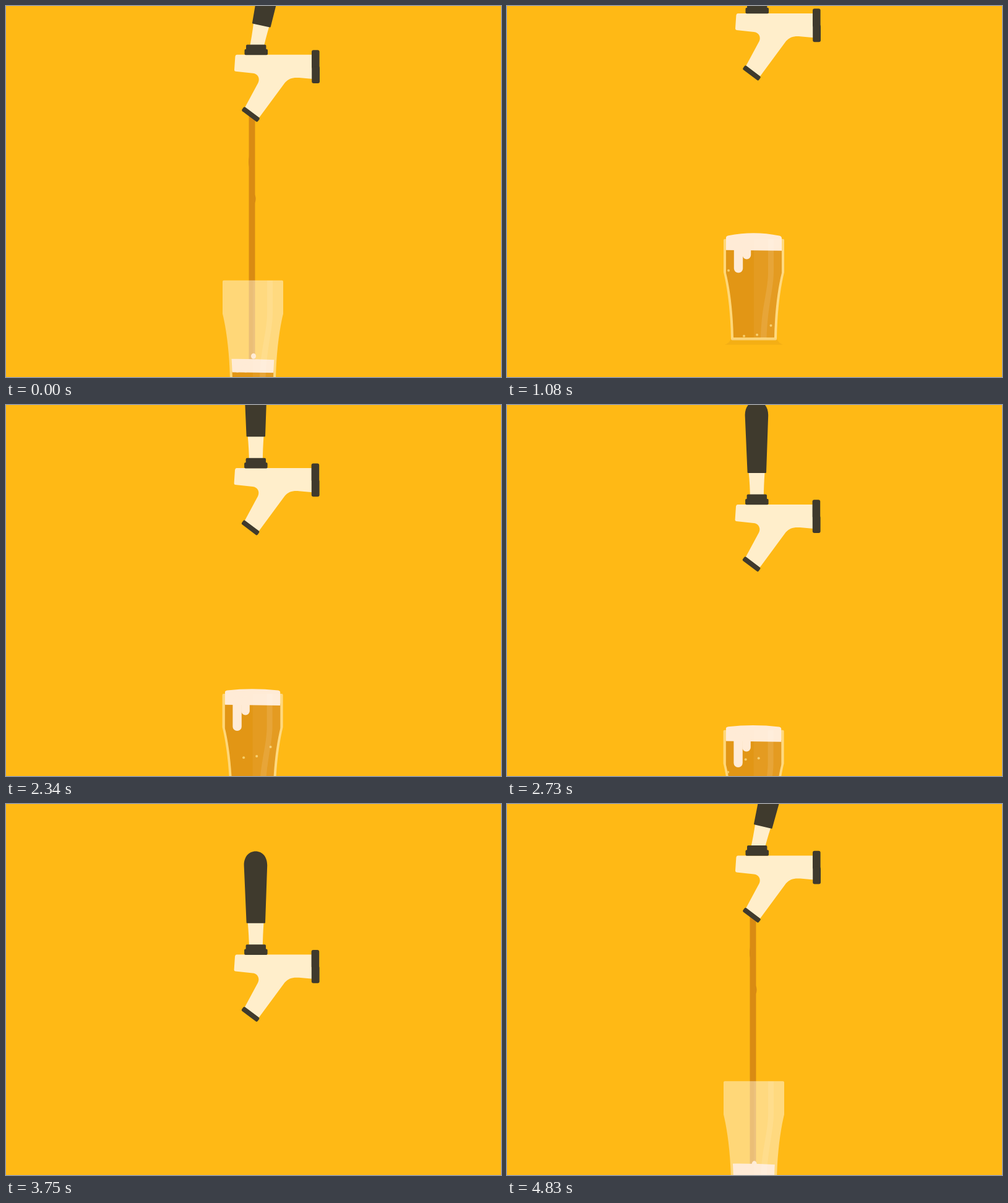
An HTML page for the animation above (4860 ms loop, 800 by 600 pixels).

```html
<!DOCTYPE html>
<html lang="en">
<head>
<meta charset="utf-8">
<title>Pouring a pint</title>
<style>
  html, body { margin: 0; width: 100%; height: 100%; overflow: hidden; background: #ffb915; }
  svg { display: block; width: 100vw; height: 100vh; }
  .dark { fill: #3f3a2d; }
  .cream { fill: #ffeecb; }
  .beer { fill: #e29615; }
  .foam { fill: #ffebd6; }
  .stream { fill: #d98b13; }
  .bubble { fill: #f7cd68; }
</style>
</head>
<body>
<svg viewBox="0 0 800 600">
  <defs>
    <path id="outer" d="M352 0H446Q448 0 448 2V54C442 78 436.5 118 436 162Q436 163.7 434 163.7H364Q362 163.7 362 162C361.5 118 356 78 350 54V2Q350 0 352 0Z"/>
    <clipPath id="glassClip"><use href="#outer"/></clipPath>
    <clipPath id="innerClip">
      <path d="M354 -30H444V55C438 78 432.7 118 432 159.4H366C365.3 118 360 78 354 55Z"/>
    </clipPath>
  </defs>

  <g id="scene">
    <g id="stream" class="stream">
      <rect id="jet" x="392.5" width="10" rx="3"/>
      <ellipse id="bumpR" cx="400" rx="3.6" ry="8"/>
      <ellipse id="bumpL" cx="395" rx="3" ry="11"/>
    </g>

    <g id="tap">
      <g id="handle">
        <path class="cream" d="M391 -45H417Q415.4 -25 415.2 0H393.4Q393 -25 391 -45Z"/>
        <path class="dark" d="M390 -43.2Q389 -43.2 389 -44.2L385 -137C385 -151 393 -159.6 403.8 -159.6S422.6 -151 422.6 -137L419.4 -44.2Q419.4 -43.2 418.4 -43.2Z"/>
      </g>
      <path class="cream" d="M373.5 7.6H496V46.8L474 44.8C463 44 457 46 451 52.5L409 109.5L386 93L407.5 53C411 46 407 38.2 399 37.6L371 34.6Q368.8 34.2 369 32L370.4 11Q370.8 7.6 373.5 7.6Z"/>
      <rect class="dark" x="388" y="-8.7" width="32.4" height="11" rx="2"/>
      <rect class="dark" x="385.5" y="-1.5" width="37.5" height="9.5" rx="2"/>
      <rect class="dark" x="494" y="0" width="12.6" height="30" rx="3"/>
      <rect class="dark" x="494.2" y="26" width="12.8" height="27.8" rx="3"/>
      <rect class="dark" x="-16" y="-4" width="32" height="8" rx="2.2" transform="translate(395.5 104) rotate(37)"/>
    </g>

    <g transform="translate(0 372.5)">
      <path fill="#f4af15" d="M362 161H436Q438 168 446 171H352Q360 168 362 161Z"/>
      <use href="#outer" fill="#fffaef" fill-opacity=".45"/>
      <g clip-path="url(#innerClip)">
        <path id="beer" class="beer"/>
        <g id="bubbles" class="bubble"></g>
        <g class="foam">
          <path id="foam"/>
          <rect id="drip1" x="366.8" width="14.4" rx="7.2"/>
          <rect id="drip2" x="380.6" width="13.6" rx="6.8"/>
          <ellipse id="splash" rx="4" ry="4.6"/>
        </g>
      </g>
      <g clip-path="url(#glassClip)" fill="#fff">
        <rect x="399" width="50" height="160" fill-opacity=".05"/>
        <path fill-opacity=".1" d="M422 0H431V52C431 80 421 110 419.5 160H410C411 110 422 85 422 52Z"/>
      </g>
    </g>
  </g>
</svg>

<script>
// Time 0 is mid-pour; the glass is swapped for an empty one while off stage.
const LOOP = 4860, SWAP = 3690;
const RIM = 372.5, NOZZLE = 104;
const OPEN = -540, SHUT = 270;
const RISE = .143, PERIOD = 885;
const bubbles = [
  { x: 355, born: 332 }, { x: 383, born: 188 },
  { x: 404, born: 174 }, { x: 426, born: 69 }
];

const $ = id => document.getElementById(id);
const set = (id, attrs) => {
  for (const k in attrs) $(id).setAttribute(k, attrs[k]);
};
const show = (el, on) => { el.style.display = on ? "" : "none"; };
const wrap = (v, n) => ((v % n) + n) % n;

const span = (t, a, b) => Math.min(1, Math.max(0, (t - a) / (b - a)));
const smooth = u => u * u * (3 - 2 * u);
const ease = (t, a, b) => smooth(span(t, a, b));
const out = (u, power) => 1 - (1 - u) ** power;

// The view rises with a long settling tail, then sinks evenly.
const camera = t =>
  236 - 232 * smooth(out(span(t, -1064, 1375), 1.8)) + 232 * ease(t, 1370, 3650);
const drift = t => .4 * (ease(t, -660, -200) - ease(t, 1100, 1700) - 1);
const lever = t => 20 * (ease(t, -850, -255) - ease(t, -255, 345));
const filled = t => ease(t, -270, 670);
const fall = s => s <= 0 ? 0 : .6 * s + .0027 * s * s;

const dots = bubbles.map(() => {
  const dot = document.createElementNS("http://www.w3.org/2000/svg", "circle");
  dot.setAttribute("r", 2);
  $("bubbles").append(dot);
  return dot;
});

function drawStream(t, top) {
  const surface = RIM + top + 4;
  const y0 = NOZZLE + fall(t - SHUT);
  const y1 = Math.min(surface, NOZZLE + fall(t - OPEN));
  const on = t > OPEN && y1 > y0;
  show($("stream"), on);
  set("jet", { y: y0, height: Math.max(0, y1 - y0) });
  const bump = (id, offset) => {
    const y = 120 + wrap(offset + t * .53, 260);
    set(id, { cy: y });
    show($(id), y > y0 + 12 && y < y1 - 12);
  };
  bump("bumpR", 120);
  bump("bumpL", 60);
  show($("splash"), on && y1 >= surface);
  set("splash", {
    cx: 400 + Math.sin(t / 90),
    cy: top + 2 - 8 * Math.abs(Math.sin((t + 40) / 38))
  });
}

function drawBeer(t, top, full) {
  const base = top + 20.7 + 2.5 * full;
  const bulge = 8 * ease(t, 300, 900) - 4 * ease(t, 1080, 1900);
  const tilt = 2 * (1 - full);
  set("beer", { d: `M350 ${base - 2}H448V162H350Z` });
  set("foam", {
    d: `M354 ${base - .4}V${top + 3}Q354 ${top} 358 ${top - .5}`
      + `Q399 ${top - bulge - 1} 440 ${top + tilt - .3}`
      + `Q444 ${top + tilt + .4} 444 ${top + tilt + 4}V${base + .8}Z`
  });
  const run = out(span(t, 480, 1700), 3);
  set("drip1", { y: base - 14.4, height: 14.4 + 42 * run });
  set("drip2", { y: base - 13.6, height: 13.6 + 16.5 * run });
  bubbles.forEach(({ x, born }, i) => {
    const age = wrap(t - born, PERIOD), y = 158 - age * RISE;
    show(dots[i], t - age > 300 && y > base);
    dots[i].setAttribute("cx", x + age * .004);
    dots[i].setAttribute("cy", y);
  });
}

function draw(ms) {
  const now = ms % LOOP;
  const t = now < SWAP ? now : now - LOOP;
  const full = filled(t), top = 161 - 166 * full;
  set("scene", { transform: `translate(${drift(t)} ${camera(t)})` });
  set("handle", { transform: `rotate(${lever(t)} 392.5 -2)` });
  drawStream(t, top);
  drawBeer(t, top, full);
}

const start = performance.now();
function tick() {
  draw(performance.now() - start);
  requestAnimationFrame(tick);
}
tick();
</script>
</body>
</html>
```
